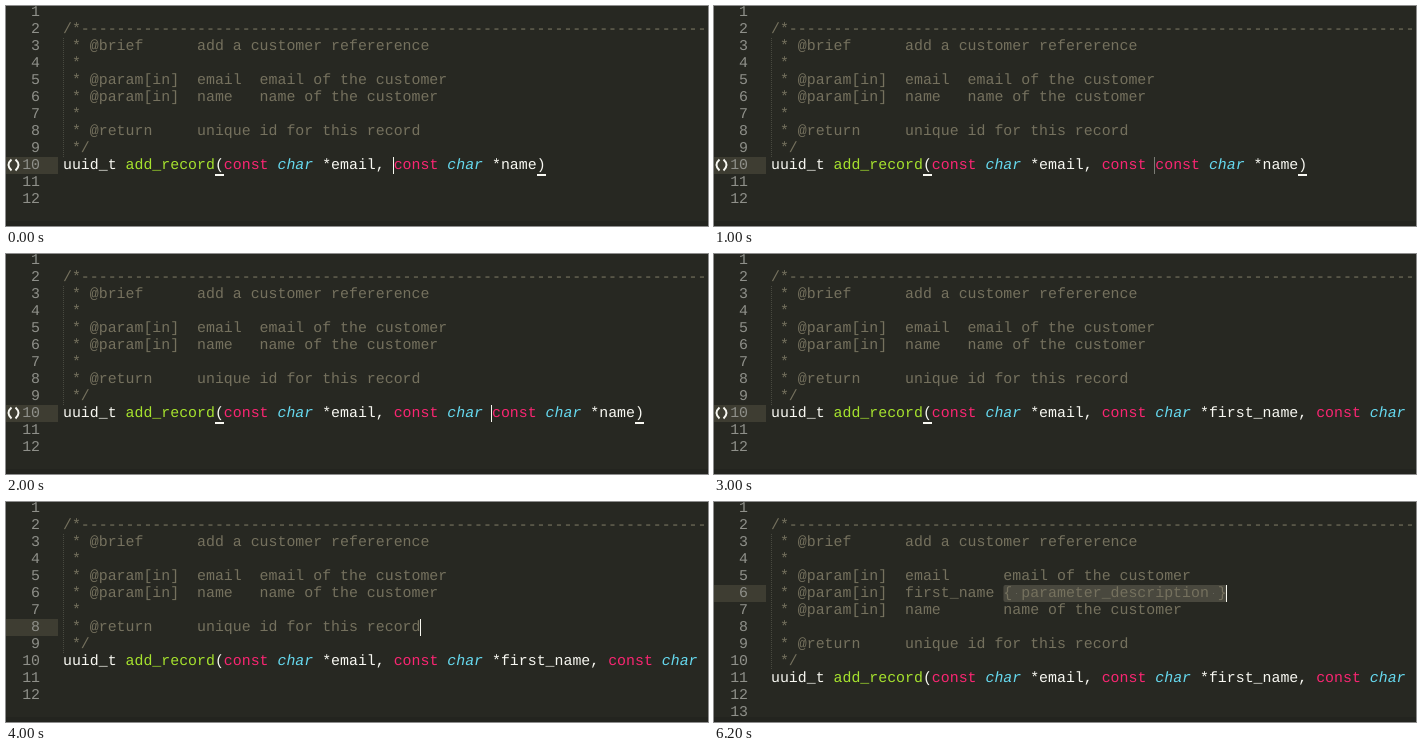
An HTML page for the animation above (7 s loop, 702 by 220 pixels).

```html
<!DOCTYPE html>
<html lang="en">
<head>
<meta charset="utf-8">
<title>Code editor</title>
<style>
  html, body { margin: 0; width: 100%; height: 100%; overflow: hidden; background: #272822; }
  svg { display: block; width: 702px; height: 220px; }
  text {
    font: 14.9px "Liberation Mono", monospace;
    white-space: pre;
    text-rendering: geometricPrecision;
    fill: #f8f8f2;
  }
  .number { fill: #8f908a; text-anchor: end; }
  .comment { fill: #75715e; }
  .const { fill: #f92672; }
  .char { fill: #66d9ef; font-style: italic; }
  .add_record { fill: #a6e22e; }
</style>
</head>
<body>
<svg id="stage" viewBox="0 0 702 220"></svg>
<script>
const LEFT = 57, CHAR = 8.94, PITCH = 17, LOOP = 7000;
const svg = document.getElementById("stage");

const rowTop = line => PITCH * line - 19;
const baseline = line => rowTop(line) + 12;
const column = index => LEFT + index * CHAR;

function add(parent, tag, attributes, content = "") {
  const node = document.createElementNS("http://www.w3.org/2000/svg", tag);
  for (const key in attributes) node.setAttribute(key, attributes[key]);
  node.textContent = content;
  parent.append(node);
  return node;
}

function addRect(parent, x, y, width, height, fill, extra = {}) {
  return add(parent, "rect", { x, y, width, height, fill, ...extra });
}

function addCode(parent, line, code) {
  const text = add(parent, "text", { x: LEFT, y: baseline(line) });
  for (const part of code.split(/(const|char|add_record)/)) {
    const style = /^(const|char|add_record)$/.test(part) ? part : "plain";
    add(text, "tspan", { class: style }, part);
  }
}

const signature = args => `uuid_t add_record(const char *email, ${args}const char *name)`;

const comment = params => [
  "/*" + "-".repeat(76),
  " * @brief      add a customer refererence",
  " *",
  ...params.map(param => " * @param[in]  " + param),
  " *",
  " * @return     unique id for this record",
  " */"
];

const shortParams = ["email  email of the customer", "name   name of the customer"];
const longParams = [
  "email      email of the customer",
  "first_name { parameter_description }",
  "name       name of the customer"
];

// caret: [line, column, opacity]
const steps = [
  { start: 0, args: "", caret: [10, 37, 1], brackets: true },
  { start: 1000, args: "const ", caret: [10, 43, 0.4], brackets: true },
  { start: 2000, args: "const char ", caret: [10, 48, 1], brackets: true },
  { start: 3000, args: "const char *first_name, ", caret: [10, 61, 0], brackets: true },
  { start: 4000, args: "const char *first_name, ", caret: [8, 40, 1] },
  { start: 5000, args: "const char *first_name, ", caret: [6, 51, 1], params: longParams, selection: [26, 51] }
];

function addSelection(parent, line, from, to) {
  addRect(parent, column(from), rowTop(line), (to - from) * CHAR, PITCH, "#49483e", { rx: 2 });
  // Selected spaces are marked with faint dots.
  for (const space of [from + 1, to - 2]) {
    addRect(parent, Math.floor(column(space + 0.5)), rowTop(line) + 8, 1, 1, "#65645a");
  }
}

function buildStep({ args, caret, brackets, params = shortParams, selection }) {
  const group = add(svg, "g", { visibility: "hidden" });
  const [caretLine, caretColumn, opacity] = caret;
  const lines = comment(params);
  const codeLine = lines.length + 2;
  const code = signature(args);

  addRect(group, 0, rowTop(caretLine), 52, PITCH, "#3e3d32");
  if (selection) addSelection(group, caretLine, ...selection);
  add(group, "path", {
    d: `M57.5 ${rowTop(3)}V${rowTop(codeLine)}`,
    stroke: "#484940", "stroke-dasharray": "1 1"
  });

  for (let n = 1; n <= codeLine + 2; n++) {
    add(group, "text", { class: "number", x: 34, y: baseline(n) }, n);
  }
  lines.forEach((line, i) =>
    add(group, "text", { class: "comment", x: LEFT, y: baseline(i + 2) }, line));
  addCode(group, codeLine, code);

  if (brackets) {
    for (const index of [code.indexOf("("), code.indexOf(")")]) {
      addRect(group, Math.round(column(index)), 168, 9, 2, "#f8f8f2");
    }
    add(group, "path", {
      d: "M5.5 153.5Q-0.5 159 5.5 164.5M9.5 153.5Q15.5 159 9.5 164.5",
      fill: "none", stroke: "#f8f8f2", "stroke-width": 2
    });
  }
  addRect(group, Math.floor(column(caretColumn) - 0.5), rowTop(caretLine), 1, PITCH, "#f8f8f0", { opacity });
  return group;
}

addRect(svg, 0, 215, 702, 5, "#23241f");
const groups = steps.map(buildStep);

function draw() {
  const time = performance.now() % LOOP;
  const current = steps.findLastIndex(step => step.start <= time);
  groups.forEach((group, i) =>
    group.setAttribute("visibility", i === current ? "visible" : "hidden"));
  requestAnimationFrame(draw);
}
draw();
</script>
</body>
</html>
```
